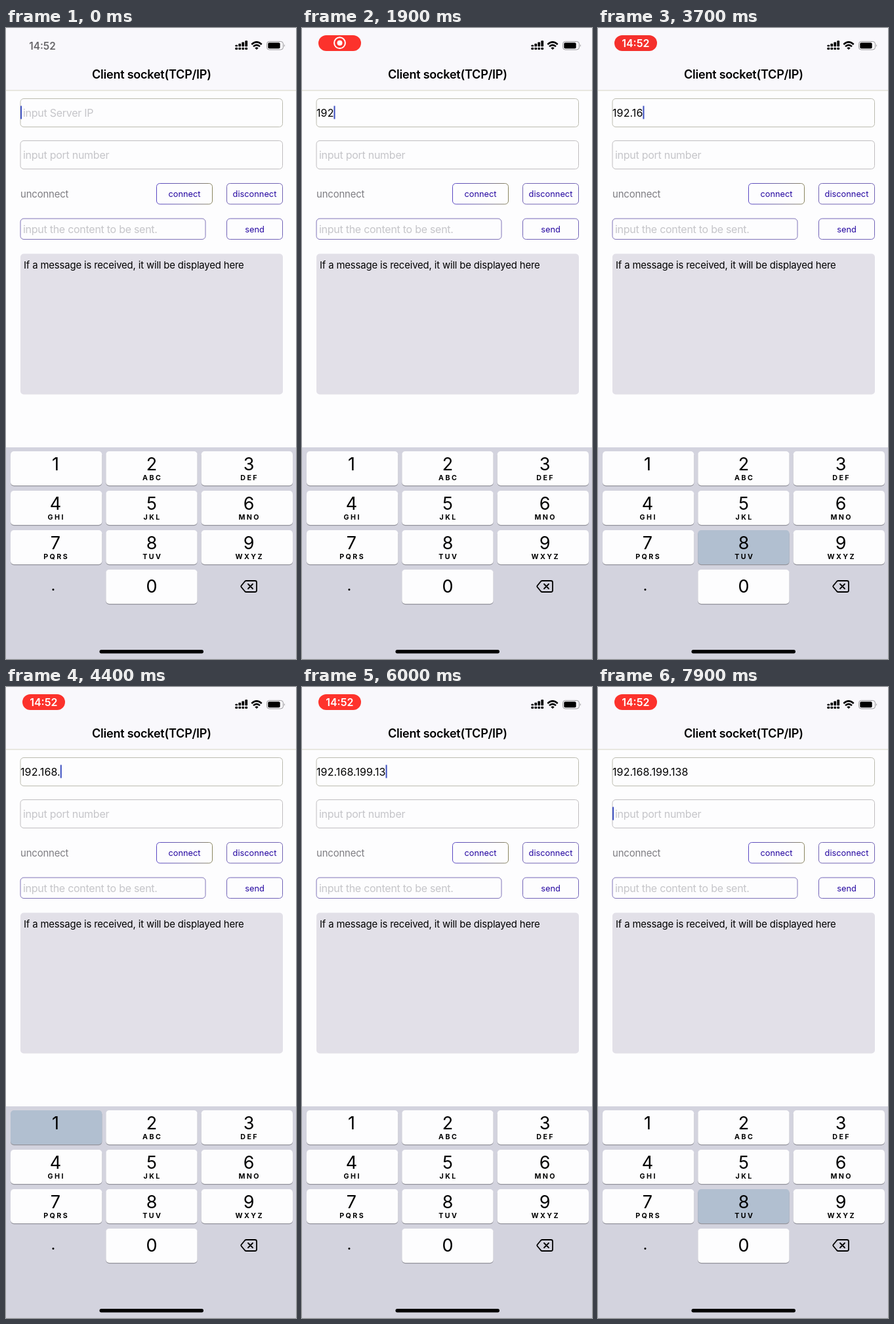
Animation of 442x960 px, one loop 8000 ms. Source, as an HTML page:

```html
<!DOCTYPE html>
<html lang="en">
<head>
<meta charset="utf-8">
<title>Client socket</title>
<style>
html, body { margin: 0; width: 100%; height: 100%; overflow: hidden; background: #fdfdfe; }
svg { display: block; width: 442px; height: 960px; font-family: Inter, Roboto, sans-serif; }
.box { fill: #fdfdfe; stroke-width: 1; }
.entry { font-size: 16px; letter-spacing: .1px; }
.hint { font-size: 16px; letter-spacing: -.27px; fill: #c5c5c9; }
.note { font-size: 14.9px; letter-spacing: -.16px; }
.button { font-size: 12.8px; text-anchor: middle; fill: #2406a0; }
.clock { font-size: 16px; font-weight: 600; text-anchor: middle; }
.digit { font-size: 27px; text-anchor: middle; }
.letters { font-size: 10.7px; font-weight: 700; letter-spacing: 2.4px; text-anchor: middle; }
.line { fill: none; stroke: #000; stroke-linecap: round; stroke-linejoin: round; }
</style>
</head>
<body>
<svg viewBox="0 0 442 960">
  <defs>
    <linearGradient id="mixed">
      <stop offset="0" stop-color="#5a48c4"/>
      <stop offset=".6" stop-color="#726a9c"/>
      <stop offset="1" stop-color="#8a8660"/>
    </linearGradient>
  </defs>
  <rect width="442" height="960" fill="#fdfdfe"/>
  <rect width="442" height="95" fill="#f9f8fc"/>
  <rect y="94.5" width="442" height="1" fill="#d5d5c4"/>

  <text id="idle" class="clock" x="55.5" y="32.5" fill="#68676a" style="font-size:15.3px">14:52</text>
  <g id="pill">
    <rect id="pillFill" x="25" y="11" width="65" height="24" rx="12"/>
    <g id="record" fill="none" stroke="#fff" stroke-width="2">
      <circle cx="57.5" cy="22.7" r="8.4"/>
      <circle cx="57.5" cy="22.7" r="4" fill="#fff" stroke="none"/>
    </g>
    <text id="time" class="clock" x="57.3" y="29" fill="#fff">14:52</text>
  </g>

  <g id="signal"></g>
  <g class="line" stroke-width="2.5" style="stroke-linecap:butt">
    <path d="M374.3 25Q382 17.8 389.7 25"/>
    <path d="M377 28.2Q382 23.6 387 28.2"/>
  </g>
  <path d="M379.3 30.4Q382 28.2 384.7 30.4L382 33Z"/>
  <rect x="397.5" y="20.5" width="25" height="12.5" rx="3.8" fill="none" stroke="#98979a"/>
  <rect x="399.3" y="22.3" width="18.4" height="9" rx="2"/>
  <path d="M424 24.8Q426 26.7 424 28.8Z" fill="#98979a"/>

  <text x="131" y="77.3" font-size="18.1" font-weight="600" letter-spacing="-.27">Client socket(TCP/IP)</text>

  <rect class="box" x="22" y="107.5" width="399.5" height="43" rx="5" stroke="#bcbcb0"/>
  <rect class="box" x="22" y="171.5" width="399.5" height="43" rx="5" stroke="#c0bdc0"/>
  <text id="ipHint" class="hint" x="26" y="135">input Server IP</text>
  <text id="ip" class="entry" x="22" y="135"></text>
  <text class="hint" x="26" y="199">input port number</text>
  <rect id="caret" y="118.5" width="2" height="20" fill="#3c4fc0"/>

  <text class="note" x="22" y="258" fill="#7e7d82">unconnect</text>
  <rect class="box" x="229.5" y="236.5" width="85" height="31.5" rx="5" stroke="url(#mixed)"/>
  <text class="button" x="272" y="257">connect</text>
  <rect class="box" x="336.5" y="236.5" width="85" height="31.5" rx="5" stroke="#7264b4"/>
  <text class="button" x="379" y="257">disconnect</text>
  <rect class="box" x="22" y="290" width="282" height="31.5" rx="5" stroke="#8074b8"/>
  <text class="hint" x="26" y="312">input the content to be sent.</text>
  <rect class="box" x="336.5" y="290" width="85" height="31.5" rx="5" stroke="#7264b8"/>
  <text class="button" x="379" y="310.5">send</text>

  <rect x="22" y="343.5" width="400" height="214" rx="5" fill="#e2e0e8"/>
  <text class="note" x="27" y="366">If a message is received, it will be displayed here</text>

  <rect y="638" width="442" height="322" fill="#d3d3de"/>
  <g id="keys"></g>
  <text class="digit" x="72" y="856" style="font-size:24px">.</text>
  <path class="line" stroke-width="1.8" d="M366 841H379.5Q382 841 382 843.5V855.5Q382 858 379.5 858H366Q365 858 364 857L358.6 850.5Q357.8 849.5 358.6 848.5L364 842Q365 841 366 841ZM369 846L376 853M376 846L369 853"/>
  <rect x="142.5" y="946" width="158.5" height="5.4" rx="2.7"/>
</svg>
<script>
const $ = id => document.getElementById(id);
const LOOP = 8000, PRESS = 130;
const IP = "192.168.199.138";
// Moment each character's key is released.
const RELEASE = [800, 1400, 1900, 2450, 3080, 3400, 3720, 4080,
                 4500, 4800, 5000, 5480, 5750, 5980, 6250];
const strokes = [...IP].map((key, i) => ({ key, at: RELEASE[i] }));
const presses = [...strokes, { key: "8", at: LOOP }];
const RECORD_AT = 500, TIME_AT = 3500, NEXT_FIELD = 7200;

function add(parent, tag, attrs, text = "") {
  const el = document.createElementNS("http://www.w3.org/2000/svg", tag);
  for (const name in attrs) el.setAttribute(name, attrs[name]);
  el.textContent = text;
  parent.append(el);
  return el;
}

[2.5, 4.5, 6.8, 9].forEach((h, i) => {
  const x = 349.3 + i * 5;
  add($("signal"), "rect", { x, y: 28.3 - h, width: 3.8, height: h, rx: 1 });
  add($("signal"), "rect", { x, y: 29.7, width: 3.8, height: 3.3, rx: 1 });
});

const caps = {};
const LETTERS = ["", "ABC", "DEF", "GHI", "JKL", "MNO", "PQRS", "TUV", "WXYZ"];
function addKey(digit, col, row, letters) {
  const x = [7, 152.3, 297.7][col], y = 644 + row * 60;
  const mid = [75.5, 222, 370][col];
  const box = { x, width: 139.3, height: 52, rx: 5 };
  add($("keys"), "rect", { ...box, y: y + 1.2, fill: "#94949c" });
  caps[digit] = add($("keys"), "rect", { ...box, y });
  add($("keys"), "text", { class: "digit", x: mid, y: y + (row < 3 ? 28.5 : 35) }, digit);
  add($("keys"), "text", { class: "letters", x: mid + 1.2, y: y + 44 }, letters);
}
LETTERS.forEach((letters, i) => addKey(i + 1, i % 3, Math.floor(i / 3), letters));
addKey(0, 1, 3, "");

const show = (el, on) => el.setAttribute("opacity", Number(on));

function draw(t) {
  const typed = IP.slice(0, strokes.filter(s => s.at <= t).length);
  if ($("ip").textContent !== typed) $("ip").textContent = typed;
  show($("ipHint"), !typed);

  const moved = t >= NEXT_FIELD;
  const width = typed && !moved ? $("ip").getComputedTextLength() : 0;
  $("caret").setAttribute("x", 22 + width);
  $("caret").setAttribute("y", moved ? 182.5 : 118.5);

  const down = presses.find(p => t >= p.at - PRESS && t < p.at);
  for (const digit in caps) {
    caps[digit].setAttribute("fill", down && down.key === digit ? "#b1bfd0" : "#fdfdfe");
  }

  show($("idle"), t < RECORD_AT);
  show($("pill"), t >= RECORD_AT);
  show($("record"), t < TIME_AT);
  show($("time"), t >= TIME_AT);
  const glow = (1 + Math.cos((t - 150) * Math.PI / 1000)) / 2;
  $("pillFill").setAttribute("fill", `rgb(${232 + 23 * glow}, ${44 + 7 * glow}, 44)`);
}

const start = performance.now();
function tick() {
  draw((performance.now() - start) % LOOP);
  requestAnimationFrame(tick);
}
tick();
</script>
</body>
</html>
```
